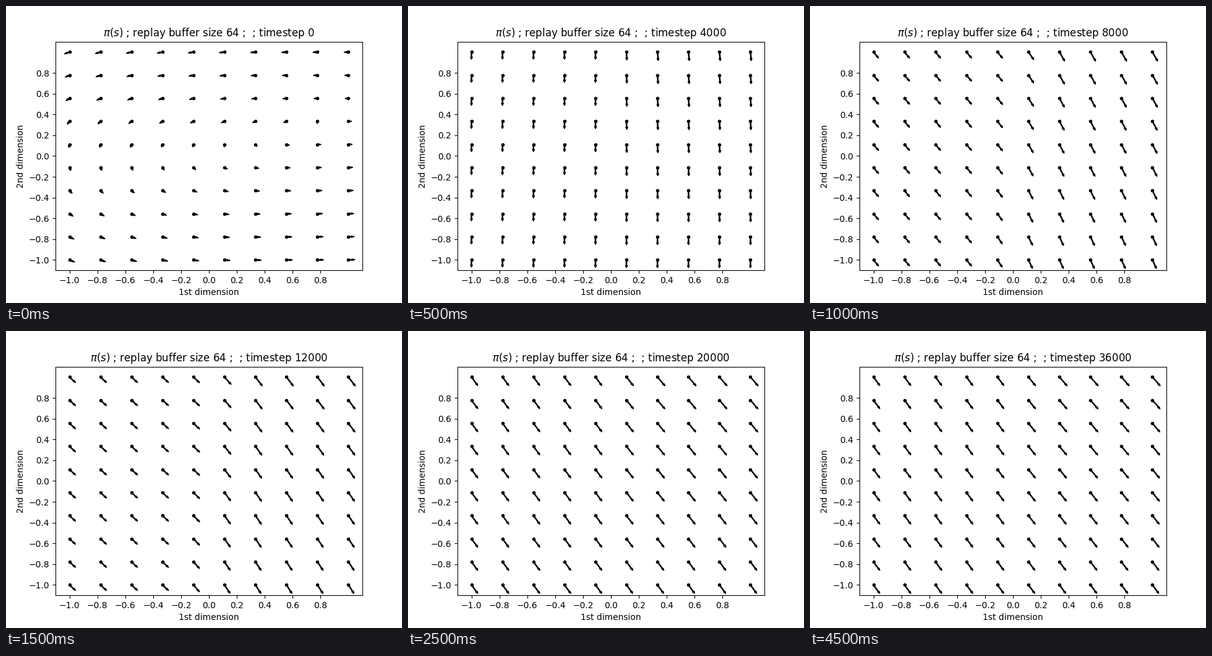
Animation, 640 px wide and 480 px high, one loop 4750 ms. Source, as a matplotlib script:

```python
import numpy as np
import matplotlib.pyplot as plt
from matplotlib.animation import FuncAnimation

FRAMES = 19
INTERVAL = 250
STEP = 2000
WARMUP = 2  # updates until the policy is first trained

grid = np.linspace(-1, 1, 10)
X, Y = (a.ravel() for a in np.meshgrid(grid, grid))


def smooth(t):
    t = np.clip(t, 0, 1)
    return t * t * (3 - 2 * t)


def untrained():
    """Small actions that flip sign across a curved boundary."""
    edge = .08 + .19 * X + .17 * X**2
    s = (1 - X) / 2
    dx = -.0175 * (Y - edge)
    dy = .0004 - .0096 * s**1.4 + .0025 * Y * (s - .5)
    return dx, dy


def trained(k):
    """Two plateaus of heading and length, joined by a steep ramp in x."""
    age = k - WARMUP
    late = smooth((age - 4) / 3)
    fast, slow = np.exp(-age / 1.3), np.exp(-age / 1.9)

    left_turn = 49 + 41 * fast + 12 * late
    right_turn = 59 + 29 * slow - 2 * Y
    left_len = .048 + .025 * late
    right_len = .0765 - .0185 * slow + .004 * Y

    ramp = 1 / (1 + np.exp(-(X - .1 * Y) / .07))
    turn = np.radians(left_turn + (right_turn - left_turn) * ramp)
    length = left_len + (right_len - left_len) * ramp
    return length * np.cos(turn), -length * np.sin(turn)


def policy(k):
    if k >= WARMUP:
        return trained(k)
    t = k / WARMUP
    (ax0, ay0), (ax1, ay1) = untrained(), trained(WARMUP)
    lean = .008 * np.sin(np.pi * t)
    return ax0 + (ax1 - ax0) * t + lean, ay0 + (ay1 - ay0) * t


fig, ax = plt.subplots(figsize=(6.4, 4.8), dpi=100)
ax.plot(X, Y, "k.", markersize=6)
arrows = [ax.arrow(x, y, dx, dy, width=.005, color="k")
          for x, y, dx, dy in zip(X, Y, *policy(0))]

ticks = np.round(np.arange(-1, .9, .2), 1) + 0.0
ax.set(xlim=(-1.1, 1.1), ylim=(-1.1, 1.1), xticks=ticks, yticks=ticks,
       xlabel="1st dimension", ylabel="2nd dimension")
title = ax.set_title("")


def update(k):
    for arrow, dx, dy in zip(arrows, *policy(k)):
        arrow.set_data(dx=dx, dy=dy)
    title.set_text(rf"$\pi(s)$ ; replay buffer size 64 ;  ; timestep {k * STEP}")
    return [*arrows, title]


anim = FuncAnimation(fig, update, frames=FRAMES, interval=INTERVAL,
                     repeat=True, repeat_delay=0, blit=False)
plt.show()
```
